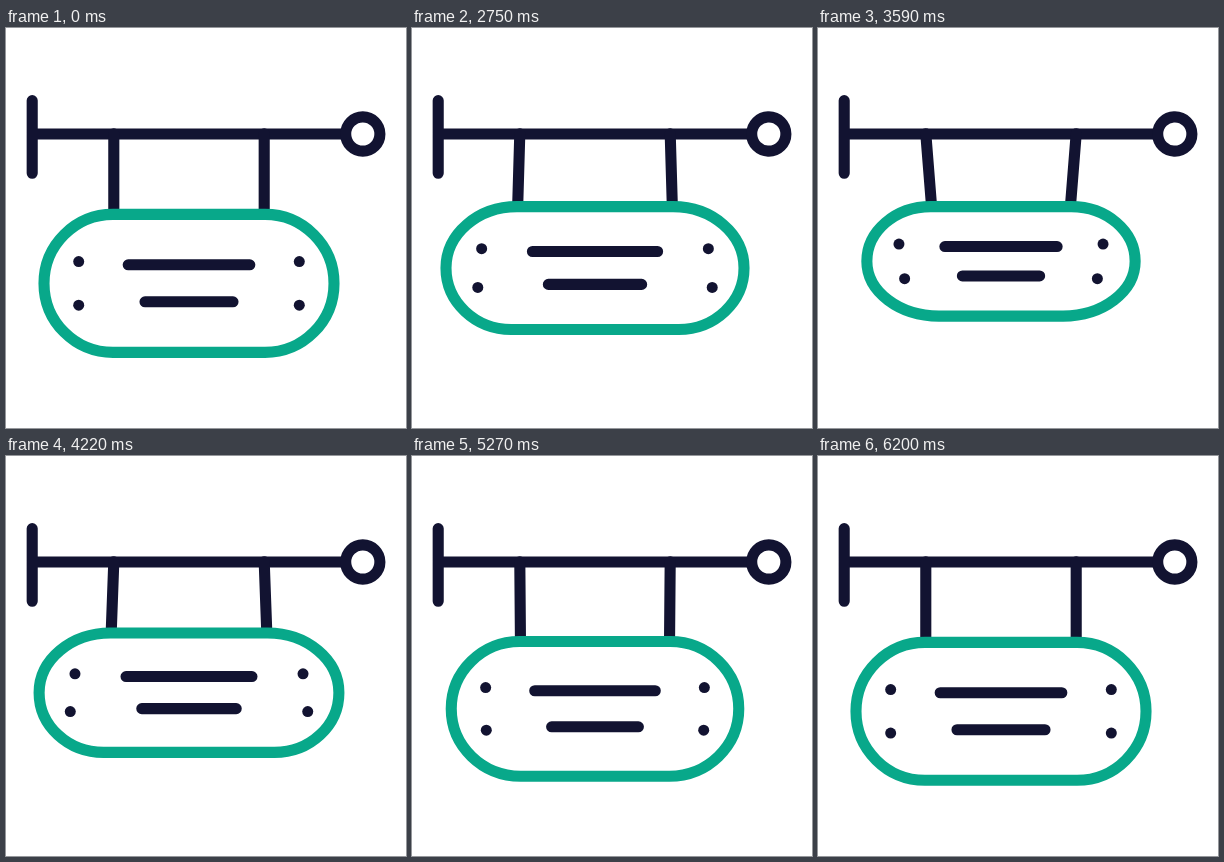
An HTML page for the animation above (6230 ms loop, 400 by 400 pixels).

```html
<!DOCTYPE html>
<html lang="en">
<head>
<meta charset="utf-8">
<title>Swinging sign</title>
<style>
  html, body { margin: 0; width: 100%; height: 100%; overflow: hidden; background: #fff; }
  svg { display: block; width: 100vw; height: 100vh; }
  .ink { fill: none; stroke: #121331; stroke-width: 11.1; stroke-linecap: round; }
  .dot { fill: #121331; }
  .board { fill: none; stroke: #08a88a; stroke-width: 11.1; }
</style>
</head>
<body>
<svg viewBox="0 0 400 400">
  <path class="ink" d="M26.2 72.6V145.3M26.2 106H339"/>
  <circle class="ink" cx="356.8" cy="106" r="17.1"/>
  <path class="ink" id="posts"/>
  <path class="board" id="board"/>
  <path class="ink" id="lines"/>
  <g id="dots">
    <circle class="dot" r="5.5"/><circle class="dot" r="5.5"/>
    <circle class="dot" r="5.5"/><circle class="dot" r="5.5"/>
  </g>
</svg>
<script>
const LOOP = 6230, HOLD = 2030, STEP = 30, START = 2011, HALF = 840;
const CX = 183, TOP = 186.4, BOTTOM = 324.4, FOLD = 235, K = 0.5523;

// lift: rise of the top edge; squash: loss of height;
// widen: perspective of the upper part; lean: extra widening per px below FOLD
const FRONT = { lift: 21, squash: 0.299, widen: 0.075, lean: 0.00225 };
const BACK = { lift: 21.2, squash: 0.56, widen: -0.203, lean: -0.0033 };
const SWINGS = [1, 1, 0.49, 0.115, 0.04];

const el = id => document.getElementById(id);
const posts = el('posts'), board = el('board'), lines = el('lines');
const dots = [...el('dots').children];

// Returns a function that moves a point (x from the centre line, y) to its swung place
function swingAt(t) {
  const now = HOLD + Math.floor((t - HOLD) / STEP) * STEP;
  const s = t < HOLD ? 0 : (now - START) / HALF;
  const n = Math.floor(s);
  const k = SWINGS[n] * Math.sin((s - n) * Math.PI);
  const p = n % 2 ? BACK : FRONT;
  return (x, y) => [
    CX + x * (1 + k * (p.widen + p.lean * Math.max(0, y - FOLD))),
    y - k * (p.lift + p.squash * (y - TOP))
  ];
}

function boardPath(at) {
  const [top, yt] = at(76, TOP), [bot, yb] = at(76, BOTTOM);
  const mid = at(145, FOLD)[0], ym = (yt + yb) / 2;
  const v = (yb - yt) / 2 * K;
  const ct = top + (mid - top) * K, cb = bot + (mid - bot) * K;
  const flip = x => 2 * CX - x;
  return `M${flip(top)} ${yt}H${top}` +
    `C${ct} ${yt} ${mid} ${ym - v} ${mid} ${ym}` +
    `S${cb} ${yb} ${bot} ${yb}H${flip(bot)}` +
    `C${flip(cb)} ${yb} ${flip(mid)} ${ym + v} ${flip(mid)} ${ym}` +
    `S${flip(ct)} ${yt} ${flip(top)} ${yt}Z`;
}

function draw(t) {
  const at = swingAt(t);
  const bar = (half, y) => `M${at(-half, y)}L${at(half, y)}`;
  const post = x => {
    const [px, py] = at(x, TOP);
    return `M${CX + x} 105.7L${px} ${py - 2}`;
  };
  board.setAttribute('d', boardPath(at));
  lines.setAttribute('d', bar(60.8, 236.8) + bar(44, 273.8));
  posts.setAttribute('d', post(-75.2) + post(75.2));
  dots.forEach((dot, i) => {
    const [x, y] = at(i % 2 ? 110.3 : -110.3, i < 2 ? 233.6 : 277.2);
    dot.setAttribute('cx', x);
    dot.setAttribute('cy', y);
  });
}

const t0 = performance.now();
function tick() {
  draw((performance.now() - t0) % LOOP);
  requestAnimationFrame(tick);
}
tick();
</script>
</body>
</html>
```
